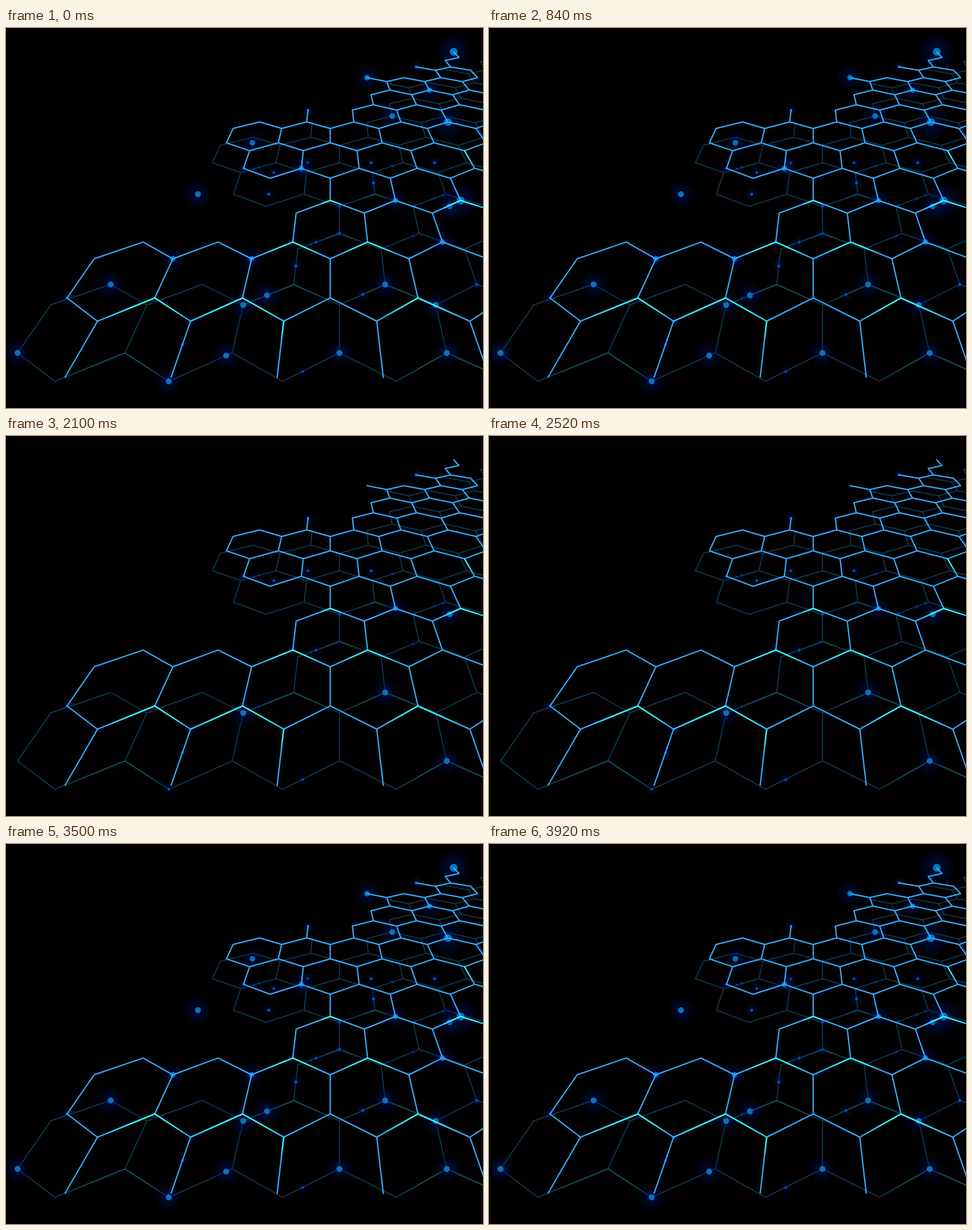
An HTML page with a canvas that plays this animation: 838 by 668 pixels, repeating every 4200 ms.

```html
<!DOCTYPE html>
<html lang="en">
<head>
<meta charset="utf-8">
<title>Hexagon network</title>
<style>
html, body { margin: 0; width: 100%; height: 100%; overflow: hidden; background: #000; }
canvas { display: block; }
</style>
</head>
<body>
<canvas id="stage" width="838" height="668"></canvas>
<script>
const ctx = document.getElementById('stage').getContext('2d');
const LOOP = 4200;
const TAU = 2 * Math.PI;

// Both floors share one outline: the first column of each zigzag strip.
const outline = [-3, -3, -0.5, -1.5, -2, -2, 0.5, 1, 1, 2.5, 3.5];
const LAST = 4;

// near + step * depth is the inverse of the drop below the horizon.
// hot: row, column, reach. nodes: level that lights them, radius, places.
const front = {
  cx: 569.6, horizon: -193, spread: 0.2309, near: 0.0012392, step: 0.0001725,
  first: 0, color: '#35acff', hotColor: '52,255,248', width: 2.3,
  hot: [[2, -2, 0.9], [2, -1, 1.1], [1, -0.5, 0.4], [4, -0.5, 0.8], [4, 0.5, 0.7],
        [6, 0, 0.35], [6, 2, 0.7], [2, 1, 0.85], [9, 2.5, 0.8]],
  nodes: [
    { level: 0, size: 4.6, at: [[6, 1]] },
    { level: 0, size: 2.4, at: [[13, -0.5], [8, -1.5], [2, -3], [20, 2.5],
                                [1, -1.5], [4, -0.5], [0.55, -1.5]] },
    { level: 1, size: 7, at: [[23, 4]] },
    { level: 1, size: 4.8, at: [[16, 2.5], [8, -0.5], [3, -2], [3, -1]] },
    { level: 2, size: 7, at: [[12, 2.5], [6, 2]] },
    { level: 2, size: 4.9, at: [[18, 1], [10, -1.5], [4, 1.5]] }
  ]
};
const back = {
  cx: 585.8, horizon: -248, spread: 0.2301, near: 0.0010105, step: 0.0001402,
  first: 1, color: '#10384f', hotColor: '18,84,84', width: 1.9,
  hot: [[2, -2, 0.9], [4, -0.5, 0.85], [2, 1, 1], [4, 0.5, 0.8], [8, 0.5, 0.4],
        [6, 0, 0.4]],
  nodes: [
    { level: 0, size: 5.3, at: [[7, 1.5], [4, 0.5], [3, -1], [2, 1]] },
    { level: 0, size: 2.2, at: [[10, -0.5], [10, 0.5], [7, 0], [9, -1], [1, -1.5],
                                [5.43, -0.285], [1.33, -0.33]] },
    { level: 1, size: 5.2, at: [[14, 1], [3, 1], [1, -1.5], [1.9, -1.05]] },
    { level: 1, size: 2.5, at: [[4, 1.5], [6, 0], [10, 1.5], [8.5, 0.5], [8, -1],
                                [4.5, -0.5], [3.5, 0.25]] },
    { level: 2, size: 5.3, at: [[8, -2], [4, -2.5], [2, -3], [2, 0], [3.46, -0.77]] },
    { level: 0, size: 1.3, at: scatter(13) }
  ]
};

// Tiny sparks somewhere along the zigzag edges.
function scatter(count) {
  let seed = 7;
  const rand = () => (seed = seed * 16807 % 2147483647) / 2147483647;
  return Array.from({ length: count }, () => {
    const m = 1 + Math.floor(rand() * 4);
    const col = firstCol(m, outline[m]) + Math.floor(rand() * 3);
    const t = rand();
    return [2 * m + 1 + t, col + t / 2];
  });
}

// Vertical edges stand on half columns in even strips, whole ones in odd strips.
function firstCol(m, from) {
  const shift = m % 2 ? 0 : 0.5;
  return Math.ceil(from - shift) + shift;
}

function vertex(grid, row, col) {
  const depthAt = n => Math.floor(n / 2) * 1.5 + n % 2;
  const base = Math.floor(row);
  const depth = depthAt(base) + (row - base) * (depthAt(base + 1) - depthAt(base));
  const drop = 1 / (grid.near + grid.step * depth);
  return [grid.cx + col * grid.spread * drop, grid.horizon + drop];
}

function line(a, b) {
  ctx.moveTo(...a);
  ctx.lineTo(...b);
}

function drawGlow(grid, a, b, reach) {
  const end = a.map((v, i) => v + (b[i] - v) * reach);
  const fade = ctx.createLinearGradient(...a, ...end);
  fade.addColorStop(0, `rgba(${grid.hotColor},1)`);
  fade.addColorStop(0.5, `rgba(${grid.hotColor},0.9)`);
  fade.addColorStop(1, `rgba(${grid.hotColor},0)`);
  ctx.strokeStyle = fade;
  ctx.beginPath();
  line(a, b);
  ctx.stroke();
}

function drawGrid(grid) {
  const at = (row, col) => vertex(grid, row, col);
  const post = (m, col) => line(at(2 * m, col), at(2 * m + 1, col));
  ctx.lineWidth = grid.width;
  ctx.lineCap = ctx.lineJoin = 'round';
  ctx.strokeStyle = grid.color;
  ctx.beginPath();
  outline.forEach((from, m) => {
    for (let col = from; col <= LAST; col += 0.5) {
      const low = (col % 1 !== 0) === (m % 2 === 0);
      const p = at(2 * m + (low ? 1 : 2), col);
      if (col === from) ctx.moveTo(...p);
      else ctx.lineTo(...p);
    }
  });
  for (let m = grid.first; m <= outline.length; m++) {
    const from = Math.max(outline[m - 1] ?? -LAST, outline[m] ?? -LAST);
    for (let col = firstCol(m, from); col <= LAST; col++) post(m, col);
  }
  post(6, -0.5);
  ctx.stroke();

  // Peaks light both sloping edges, valleys the upright edge below.
  for (const [row, col, reach] of grid.hot) {
    const sides = row % 2 ? [0] : [-0.5, 0.5];
    for (const dx of sides) drawGlow(grid, at(row, col), at(row - 1, col + dx), reach);
  }
}

function disc(x, y, r, color) {
  ctx.fillStyle = color;
  ctx.beginPath();
  ctx.arc(x, y, r, 0, TAU);
  ctx.fill();
}

function drawNodes(grid, level) {
  for (const group of grid.nodes) {
    if (group.level > level) continue;
    const r = group.size;
    for (const place of group.at) {
      const [x, y] = vertex(grid, ...place);
      for (const scale of [4.3, 3.1, 2]) disc(x, y, r * scale, 'rgba(0,26,105,0.14)');
      disc(x, y, r, r < 3 ? '#0a56aa' : '#0a70c2');
    }
  }
}

function draw(t) {
  const level = t < 1400 || t >= 3500 ? 2 : t < 2100 || t >= 2800 ? 1 : 0;
  ctx.fillStyle = '#000';
  ctx.fillRect(0, 0, 838, 668);
  drawGrid(back);
  drawNodes(back, level);
  drawNodes(front, level);
  drawGrid(front);
}

const start = performance.now();
function tick() {
  draw((performance.now() - start) % LOOP);
  requestAnimationFrame(tick);
}
tick();
</script>
</body>
</html>
```
